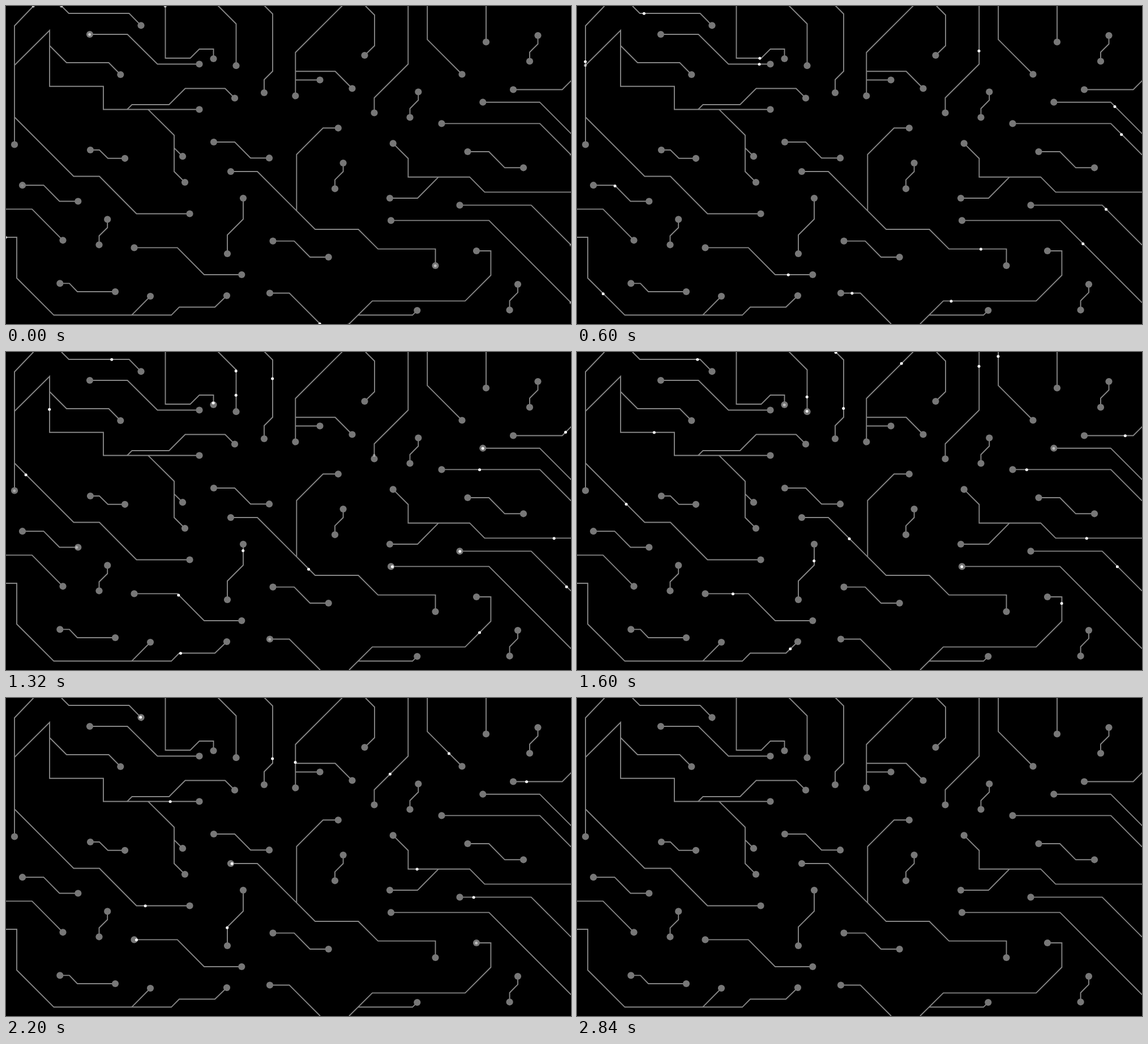
Write an HTML page that moves like this. It is 998 px wide and 561 px high and loops after 2.88 s.

```html
<!DOCTYPE html>
<html lang="en">
<head>
<meta charset="utf-8">
<title>Circuit traces</title>
<style>
  html, body { margin: 0; width: 100%; height: 100%; overflow: hidden; background: #000; }
  svg { display: block; width: 100%; height: 100%; }
  #traces path { fill: none; stroke: #858585; stroke-width: 1.9; }
  .s { marker-start: url(#node); }
  .e { marker-end: url(#node); }
  #dots circle { fill: #fff; }
</style>
</head>
<body>
<svg viewBox="0 0 998 561">
  <defs>
    <marker id="node" markerUnits="userSpaceOnUse" markerWidth="14" markerHeight="14" refX="7" refY="7">
      <circle cx="7" cy="7" r="6.1" fill="#777"/>
    </marker>
  </defs>

  <!-- data-run: start, arrival and optional fade time in ms; several runs are split by ";" -->
  <g id="traces">
    <path class="e" d="M48.5 0 15 35V244.5" data-run="0 1320 1300"/>
    <path class="e" d="M98 0 111 13H217.5L238.5 34.3" data-run="0 2300"/>
    <path class="e" d="M281.5 0V92H325.5L341.5 76H366.5V93" data-run="0 1600" data-ease=".24 .18"/>
    <path class="s e" d="M148 50H214.5L267.5 102.5H341.5" data-run="0 735 1000"/>
    <path class="e" d="M15 104.5 77 43V141.7H172V182.5H341.5" data-run="600 2600"/>
    <path class="e" d="M77 70 107 100H181.5L202.3 121"/>
    <path class="e" d="M214 182.5 222.5 174H288L316.5 145.5H387L404 162.5"/>
    <path class="e" d="M251 182.5 297 228V292L316 311"/>
    <path class="e" d="M297 250.5 312 265.2"/>
    <path class="e" d="M15 196 119.5 300.5H165L230.5 366.5H324.5" data-run="1045 2675"/>

    <path class="e" d="M363 -12 406.5 31.5V105.2" data-run="530 1660; 760 1930"/>
    <path class="e" d="M445 -12 471 14V115L456 130V153" data-run="717 2152 2080; 1345 2670 2600"/>
    <path class="e" d="M605.5 -12 511.3 82V158.5" data-run="1150 2650 2760"/>
    <path class="e" d="M511 115.3H581.5L611.5 145.5"/>
    <path class="e" d="M511 130.5H554.5"/>
    <path class="e" d="M635 0 651 16V70L633.5 87"/>
    <path class="e" d="M710.3 -12V102.5L650.5 162V188.5" data-run="-78 1480 1300; 1200 2760 2600"/>
    <path class="e" d="M744.2 -12V59.2L805.5 120.5" data-run="1331 2555"/>
    <path class="e" d="M848 0V63.5"/>
    <path class="s e" d="M939.5 52V67L925 81.5V97.5"/>
    <path class="s e" d="M728.3 151.5V166L713.5 181V196.5"/>

    <path class="e" d="M1010.5 119.5 982.5 147.5H896" data-run="612 2812 2700"/>
    <path class="e" d="M1069 296 942.7 169.7H842.3" data-run="-385 1348 1600"/>
    <path class="e" d="M998 262.5 943 207.4H769.5" data-run="38 1980"/>
    <path class="e" d="M998 328.4H845.5L819 301.7H710.4V269L683.7 242.4" data-run="1021 2740 2700"/>
    <path class="e" d="M764 301.7 727 339H678"/>
    <path class="s e" d="M815.5 257H853L881 285.3H914"/>
    <path class="e" d="M998 421.5 927.7 351.4H801.5" data-run="27 1360 1420; 1145 2475"/>
    <path class="e" d="M998 523.3 853.2 378.4H680" data-run="16 1389 1680"/>

    <path class="s e" d="M595.6 277V292L581 306.6V322.3"/>
    <path class="s" d="M586.8 215.3H560L513.3 262V361"/>
    <path class="s e" d="M367 240H404L432 268.2H465"/>
    <path class="s e" d="M149 254H165L180 268.8H210"/>
    <path class="s e" d="M758.5 458V428.6H657L622.4 394H546L444 292H397" data-run="8 2300"/>
    <path class="s e" d="M419 339V376L391 404V437" data-run="930 2910 2760"/>
    <path class="s e" d="M471.5 414.6H509L537 443H569.7"/>

    <path class="s e" d="M29 316.2H66.5L94.5 344.5H127.3" data-run="40 1440 1310"/>
    <path class="e" d="M0 358.4H46L100.5 413.3"/>
    <path class="s e" d="M179.2 376.4V391L164.5 405.5V421.3"/>
    <path class="e" d="M0 408H19V480L84.5 545.3H292L306 531.3H369L390 511" data-run="0 1805"/>
    <path class="e" d="M222 545.3 255 512"/>
    <path class="s e" d="M416.3 474H350L302.7 426.4H226.5" data-run="120 2400" data-ease=".15 .67"/>
    <path class="s e" d="M95.3 489.4H112L126 504H193"/>
    <path class="e" d="M555 561 500.5 506.5H466" data-run="-40 838 1300"/>
    <path class="e" d="M606 561 647 520.4H811L856.4 475V432H831" data-run="33 1990 2200"/>
    <path class="e" d="M622 545.3H718L726.3 537"/>
    <path class="s e" d="M904 491V505.3L889.6 520V536.3"/>
  </g>
  <g id="dots"></g>
</svg>
<script>
  const LOOP = 2880, STEP = 40;
  const layer = document.getElementById('dots');
  const clamp = v => Math.min(1, Math.max(0, v));
  const numbers = text => text.trim().split(/\s+/).map(Number);

  // cubic-bezier(a, 0, b, 1), solved by bisection
  function ease(x, a, b) {
    let lo = 0, hi = 1, s = 0.5;
    for (let i = 0; i < 20; i++) {
      s = (lo + hi) / 2;
      const r = 1 - s;
      if (3 * s * r * r * a + 3 * s * s * r * b + s ** 3 < x) lo = s; else hi = s;
    }
    return s * s * (3 - 2 * s);
  }

  function makeDot(path, run) {
    const [start, end, gone = end] = numbers(run);
    const [a, b] = numbers(path.dataset.ease || '.3333 .6667');
    const circle = document.createElementNS(layer.namespaceURI, 'circle');
    circle.setAttribute('r', 2.5);
    layer.append(circle);
    return { path, start, end, gone, a, b, circle, length: path.getTotalLength() };
  }

  const dots = [...document.querySelectorAll('[data-run]')].flatMap(path =>
    path.dataset.run.split(';').map(run => makeDot(path, run)));

  function draw() {
    const t = Math.floor(performance.now() % LOOP / STEP) * STEP;
    for (const d of dots) {
      const alpha = Math.min(clamp((t - d.start + 50) / 80), clamp((d.gone + 80 - t) / 160));
      d.circle.setAttribute('opacity', alpha);
      if (!alpha) continue;
      const progress = ease(clamp((t - d.start) / (d.end - d.start)), d.a, d.b);
      const p = d.path.getPointAtLength(progress * d.length);
      d.circle.setAttribute('cx', p.x - 0.3);
      d.circle.setAttribute('cy', p.y + 0.3);
    }
    requestAnimationFrame(draw);
  }
  draw();
</script>
</body>
</html>
```
